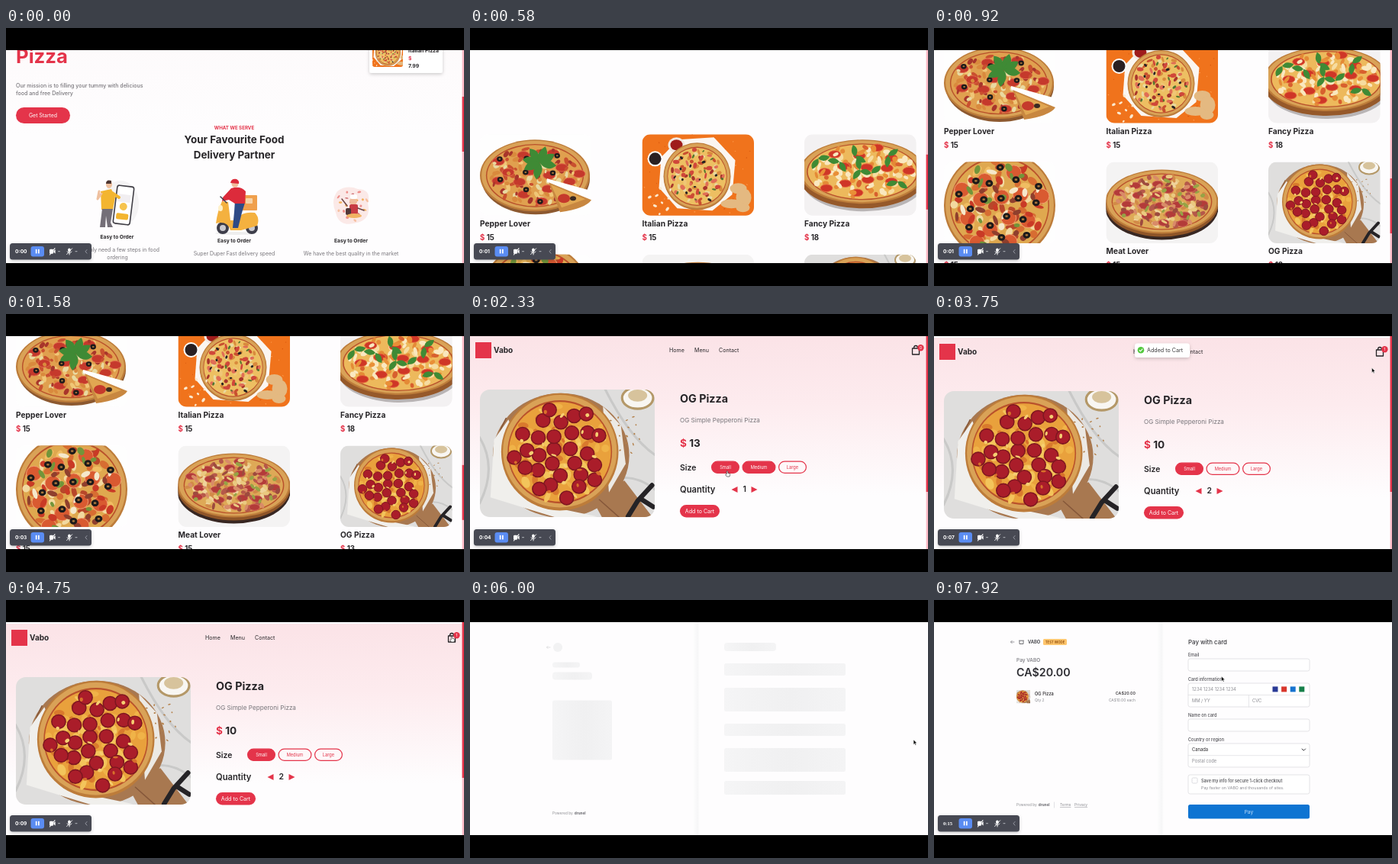
These frames come from a looping animation (600 px wide and 338 px high, 8000 ms). An HTML page:

```html
<!DOCTYPE html>
<html lang="en">
<head>
<meta charset="utf-8">
<title>Pizza order</title>
<style>
html, body { margin: 0; width: 100%; height: 100%; overflow: hidden; background: #000; }
svg { display: block; }
#stage { width: 100vw; height: 100vh; }
text { font-family: Inter, "Open Sans", sans-serif; white-space: pre; }
</style>
</head>
<body>
<svg id="stage" viewBox="0 0 600 338"></svg>
<script>
const LOOP = 8000, RED = '#e4344a', INK = '#272528', GREY = '#77757a';
const BRAND = 'Vabo', PAYER = 'drunel';

// ---- drawing helpers (all return markup) ----
const rect = (x, y, w, h, fill, r = 0, more = '') =>
  `<rect x="${x}" y="${y}" width="${w}" height="${h}" rx="${r}" fill="${fill}" ${more}/>`;
const oval = (x, y, rx, ry, fill, more = '') =>
  `<ellipse cx="${x}" cy="${y}" rx="${rx}" ry="${ry}" fill="${fill}" ${more}/>`;
const path = (d, fill, more = '') => `<path d="${d}" fill="${fill}" ${more}/>`;
const line = (d, color, w = 1, more = '') =>
  path(d, 'none', `stroke="${color}" stroke-width="${w}" stroke-linecap="round" stroke-linejoin="round" ${more}`);
const group = (body, id = '', more = '') => `<g ${id && `id="${id}"`} ${more}>${body}</g>`;
const move = (x, y, body) => group(body, '', `transform="translate(${x} ${y})"`);
// y is the middle of the capital letters
const text = (x, y, s, size, weight = 400, fill = INK, anchor = 'start', more = '') =>
  `<text x="${x}" y="${(y + size * 0.36).toFixed(2)}" font-size="${size}" font-weight="${weight}" fill="${fill}" text-anchor="${anchor}" ${more}>${s}</text>`;
const mid = (x, y, s, size, weight, fill, more) => text(x, y, s, size, weight, fill, 'middle', more);
let clips = 0;
const rounded = (x, y, w, h, r, body) => {
  const id = 'clip' + clips++;
  return `<clipPath id="${id}">${rect(x, y, w, h, '#000', r)}</clipPath>` + group(body, '', `clip-path="url(#${id})"`);
};

// ---- pizzas ----
let seed = 7;
const rnd = () => (seed = (seed * 16807) % 2147483647) / 2147483647;
const pick = list => list[Math.floor(rnd() * list.length)];

function spread(n, cx, cy, rx, ry, make) {
  const turn = rnd() * 6;
  let s = '';
  for (let i = 0; i < n; i++) {
    const a = turn + i * 2.4 + rnd() * 0.3, r = Math.sqrt((i + 0.5) / n);
    s += make((cx + rx * r * Math.cos(a)).toFixed(1), (cy + ry * r * Math.sin(a)).toFixed(1));
  }
  return s;
}
const bits = (n, size, colors) => (cx, cy, rx, ry) => spread(n, cx, cy, rx, ry, (x, y) =>
  oval(x, y, (size * (0.6 + rnd() * 0.6)).toFixed(1), (size * (0.35 + rnd() * 0.4)).toFixed(1), pick(colors),
    `transform="rotate(${Math.floor(rnd() * 180)} ${x} ${y})"`));
const slices = (n, size, fill, rim) => (cx, cy, rx, ry) => spread(n, cx, cy, rx, ry, (x, y) =>
  oval(x, y, size, (size * Math.max(ry / rx, 0.6)).toFixed(1), fill, `stroke="${rim}" stroke-width="1"`));
const olives = (n, size) => (cx, cy, rx, ry) => spread(n, cx, cy, rx, ry, (x, y) =>
  oval(x, y, size, size * 0.85, '#a8763c', `stroke="#1d1a1a" stroke-width="${size * 0.9}"`));
const pie = (cx, cy, rx, ry, cheese, ...tops) =>
  oval(cx, cy, rx, ry, '#bd7c3a') + oval(cx, cy - 0.5, rx * 0.97, ry * 0.96, '#d9a257') +
  oval(cx, cy, rx * 0.89, ry * 0.88, '#b9512b') + oval(cx, cy, rx * 0.87, ry * 0.85, cheese) +
  tops.map(f => f(cx, cy, rx * 0.82, ry * 0.8)).join('');
const leaf = (x, y, turn, size = 1) =>
  path('M0 0Q5 -9 17 -3Q11 7 0 0', '#3f8a35', `transform="translate(${x} ${y}) rotate(${turn}) scale(${size})"`);

const MIX = ['#f0c676', '#c9502f', '#e9d9a0', '#a8352b', '#d98a3d'];
const PHOTO = {
  pepper: rect(0, 0, 146, 107, '#fefefe') + oval(73, 58, 71, 47, '#8d5930') +
    pie(72, 54, 72, 47, '#e0a04f', bits(70, 5, MIX), slices(15, 8, '#c5392c', '#e0684a'), bits(45, 3.5, MIX), olives(9, 2.6)) +
    path('M88 58L146 74L130 108L88 62', '#fefefe') + path('M90 63L146 86Q139 97 105 102Z', '#c88740') +
    path('M93 66L138 85L107 96Z', '#e1a752') + oval(110, 84, 8, 6, '#c5392c') + oval(122, 84, 4, 3, '#3b2a22') +
    [-160, -115, -60, -20, 20, 110, 165].map(a => leaf(78, 37, a, 1.3)).join(''),
  italian: rect(0, 0, 147, 107, '#f0731c') + bits(60, 1, ['#ffa052', '#d9580e'])(73, 53, 80, 60) +
    path('M47 7L94 4L122 34L118 79L92 100L46 97L22 70L25 30Z', '#fbf6f1') +
    oval(45, 14, 11, 10, '#f2e9e2') + oval(45, 14, 8, 7, '#9f1c1c') + oval(17, 32, 10, 10, '#fff') + oval(17, 32, 8, 8, '#2a2022') +
    pie(72, 55, 44, 44, '#edbf62', bits(60, 3.5, MIX), bits(26, 4, ['#d0473a', '#e06d55']), bits(22, 2.4, ['#54772f', '#272321'])) +
    [[126, 71, 11, 7], [133, 83, 10, 12], [117, 91, 14, 6], [132, 96, 9, 6]].map(e => oval(...e, '#e4b981')).join('') +
    bits(9, 2.5, ['#fbe9cf'])(25, 85, 18, 20),
  fancy: rect(0, 0, 147, 107, '#f3f1f2') + oval(78, 62, 80, 39, '#b9b5b6') + oval(76, 57, 82, 40, '#96592a') +
    pie(76, 49, 82, 42, '#edb95c', bits(75, 5, ['#f6dca0', '#d8602e', '#e48a36', '#fae8c0']), slices(14, 8, '#cf3627', '#e86f40'), bits(24, 5, ['#f9e7bd', '#e98f37'])) +
    [[18, 32], [46, 36], [73, 46], [88, 51], [67, 29], [110, 28], [122, 62]].map(([x, y], i) => leaf(x, y, i * 67, 0.9) + leaf(x, y, i * 67 + 130, 0.9)).join(''),
  veggie: rect(0, 0, 146, 107, '#fefefe') +
    pie(73, 57, 73, 72, '#dfa84f', bits(70, 7, ['#f2d9a0', '#d76d32', '#f0bd62', '#b8472a']), slices(13, 10, '#d95a31', '#f0a070'), bits(45, 6, ['#f5e8cb', '#c93a26', '#72953a', '#8f3f2d']), olives(18, 3.4)),
  meat: rect(0, 0, 147, 107, '#f4f3f3') + oval(73, 60, 74, 42, '#382722') + oval(73, 56, 74, 42, '#8f5528') +
    pie(73, 52, 74, 42, '#dea957', bits(80, 5, ['#efd39b', '#d28a48', '#b5584a']), slices(20, 7, '#b33b39', '#cf6557'), bits(70, 4, ['#eac980', '#9d4a3e', '#d98b68', '#96a345'])),
  og: rect(0, 0, 147, 107, '#dfdedd') + line('M0 40Q15 65 0 95M105 0Q125 40 147 55M112 75Q130 70 147 84', '#c9c9c8', 2) +
    oval(68, 55, 57, 52, '#a87850') + path('M92 88L121 76L147 110L104 110Z', '#a87850') + line('M100 92L118 108M22 24Q9 47 17 74', '#86583a', 1) +
    path('M12 42L24 25L55 97L98 106L74 110L38 99L9 90Z', '#f0efec') + path('M103 14L118 30L122 62L108 86Z', '#ece9e4') +
    oval(132, 7, 13, 9, '#f8f6f2', 'stroke="#b49868" stroke-width="2"') + oval(132, 5, 8, 5, '#d7c39c') +
    line('M144 80L132 93L124 106M134 91L145 98', '#252326', 4) + bits(18, 1, ['#b4814b'])(121, 37, 15, 18) +
    pie(67, 52, 49, 49, '#e9a13c', bits(70, 4.5, ['#f3c45b', '#d97a2d', '#f0b348']), slices(29, 5.8, '#aa1d2a', '#7f1620'), bits(24, 2, ['#f6cf72', '#d8702b']))
};
const ogUse = (x, y, w, h, r) => rounded(x, y, w, h, r, `<use href="#og" x="${x}" y="${y}" width="${w}" height="${h}"/>`);

// ---- home page ----
const courier =
  oval(301, 269, 27, 2, '#eeeeee') + oval(284, 262, 8, 8, '#3d3d4a') + oval(322, 262, 8, 8, '#3d3d4a') +
  oval(284, 262, 4, 4, '#c9c9cf') + oval(322, 262, 4, 4, '#c9c9cf') +
  rect(308, 219, 21, 20, '#f0a04d', 1) + rect(314, 223, 9, 7, '#f7d3a8', 1) +
  path('M275 256Q277 240 283 227L291 228L294 252L304 252Q306 240 326 242Q333 249 329 259L308 265H294Q290 252 275 256Z', '#f4b13f') +
  path('M300 226L313 229L309 242L304 262H297L299 241Z', '#2e4a86') + path('M295 210Q307 206 314 214L313 230H300L292 225L283 227L284 222Z', '#dc2b3b') +
  oval(300, 204, 4.5, 5, '#f1bd9c') + path('M294 203Q295 197 302 198Q306 200 305 204Z', '#dc2b3b') +
  line('M281 221L289 229', '#3d3d4a', 1.5) + oval(281, 236, 3, 4, '#fff1c9');
const phoneMan =
  oval(150, 230, 24, 30, '#f4f3f4') +
  path('M124 214L138 211L143 222L140 238H125Z', '#f3b52f') + path('M126 237H140L137 255L140 261H133L131 246L130 261H123Z', '#746f78') +
  oval(135, 205, 4, 5, '#efc09f') + path('M131 204Q131 198 138 200L138 204Z', '#4b3430') + line('M125 217L120 224L122 214', '#efc09f', 3) +
  group(rect(143, 207, 22, 50, '#fff', 3, 'stroke="#403e45" stroke-width="1.6"') + rect(146, 218, 16, 10, '#f1eef1', 1) +
    oval(154, 234, 5, 5, '#f6c34d') + rect(146, 243, 16, 8, '#f3b52f', 2), '', 'transform="rotate(7 154 232)"') +
  line('M139 216L148 222', '#f3b52f', 4);
const chefs =
  path('M434 214Q446 205 461 211Q479 211 474 230Q479 250 460 255Q436 262 432 242Q425 226 434 214Z', '#fbe9e7') +
  bits(20, 2.4, ['#ee8f8a', '#f6c0a2', '#f3b25e', '#d2777a'])(453, 232, 21, 22) +
  oval(455, 227, 5, 5, '#efbd9c') + rect(450, 231, 11, 13, '#c73b43', 2) + rect(451, 218, 9, 6, '#fff', 2) +
  rect(445, 236, 7, 9, '#503738', 2) + oval(456, 246, 10, 3, '#f1b363') + line('M440 224L447 233M469 239L461 236', '#6a4444', 1.5);

const home = () => {
  const cols = [13, 225.5, 438], dishes = [
    ['pepper', 'Pepper Lover', 15], ['italian', 'Italian Pizza', 15], ['fancy', 'Fancy Pizza', 18],
    ['veggie', '', 15], ['meat', 'Meat Lover', 15], ['og', 'OG Pizza', 13]];
  const menu = dishes.map(([key, name, price], i) => {
    const x = cols[i % 3], y = 433 + (i > 2 ? 157.5 : 0);
    return move(x, y, rounded(0, 0, 146.5, 106.5, 11, PHOTO[key])) + text(x, y + 117, name, 10.2, 700) +
      text(x, y + 135.5, `<tspan fill="${RED}">$</tspan> ${price}`, 9.7, 700);
  }).join('');
  return rect(0, -40, 600, 360, 'url(#blush)') +
    rect(476, 0, 96, 59, '#fff', 3, 'filter="url(#soft)"') +
    rounded(480, 0, 40, 51, 3, move(480, 10, group(PHOTO.italian, '', 'transform="translate(-7 0) scale(.38 .4)"'))) +
    text(527, 30, 'Italian Pizza', 6.8, 700) + text(527, 40, '$', 6.8, 700, RED) + text(527, 50, '7.99', 6.8, 700) +
    text(13, 37, 'Pizza', 25.7, 700, RED) +
    text(13, 75.5, 'Our mission is to filling your tummy with delicious', 7.05, 500, GREY) +
    text(13, 85.5, 'food and free Delivery', 7.05, 500, GREY) +
    rect(13, 104, 71, 21, RED, 10.5) + mid(48.5, 114.5, 'Get Started', 6.9, 400, '#fff') +
    mid(299, 130.5, 'WHAT WE SERVE', 6.2, 700, RED) +
    mid(299, 146, 'Your Favourite Food', 13.45, 700, INK) + mid(299, 166, 'Delivery Partner', 13.45, 700, INK) +
    phoneMan + courier + chefs +
    mid(145.5, 273.5, 'Easy to Order', 6.7, 700, INK) + mid(299, 278.5, 'Easy to Order', 6.7, 700, INK) + mid(452, 278.5, 'Easy to Order', 6.7, 700, INK) +
    mid(146, 290.5, 'You only need a few steps in food', 6.9, 400, GREY) + mid(146, 300.5, 'ordering', 6.9, 400, GREY) +
    mid(299, 295.5, 'Super Duper Fast delivery speed', 6.9, 400, GREY) +
    mid(452, 295.5, 'We have the best quality in the market', 6.9, 400, GREY) + menu;
};

// ---- product page ----
const pill = (id, x, w, label) =>
  group(rect(x + 0.6, 193.2, w - 1.2, 15.2, '#fff', 7.6, `stroke="${RED}" stroke-width="1.2"`) + mid(x + w / 2, 200.8, label, 5.7, 400, RED), id);
const product = () =>
  rect(0, 29, 600, 290, 'url(#pink)') +
  rect(7, 37, 21, 21, RED) + text(31, 47.5, BRAND, 10, 700) +
  text(261, 47.5, 'Home', 7.1) + text(294, 47.5, 'Menu', 7.1) + text(326, 47.5, 'Contact', 7.1) +
  line('M579.5 45H588.5V53H579.5ZM581.5 45Q581.5 41.5 584 41.5T586.5 45', '#252326', 1.3) +
  oval(590.4, 44.2, 4.2, 4.2, RED) + mid(590.4, 44.2, '0', 5.4, 400, '#fff', 'id="badge"') +
  ogUse(13, 99, 229, 167, 13) +
  text(275, 110.5, 'OG Pizza', 14.3, 700) + text(275, 139.5, 'OG Simple Pepperoni Pizza', 8.15, 400, GREY) +
  text(275, 169, `<tspan fill="${RED}">$</tspan> <tspan id="price">13</tspan>`, 13.6, 700) +
  text(275, 201, 'Size', 10.4, 600) + pill('small', 316, 37, 'Small') + pill('medium', 356.5, 44, 'Medium') + pill('large', 404, 37, 'Large') +
  text(275, 229.5, 'Quantity', 11.2, 600) + path('M350.5 226V234L342.5 230Z', RED) +
  text(357.5, 229.5, '1', 10.4, 600, INK, 'start', 'id="qty"') + path('M368.5 226V234L376.5 230Z', RED, 'id="more"') +
  rect(275, 250, 52, 16.5, RED, 8.2) + mid(301, 258.2, 'Add to Cart', 7.1, 400, '#fff') +
  group(rect(263, 36.5, 72, 18.5, '#fff', 3.5, 'filter="url(#soft)"') + oval(271, 45.3, 4.3, 4.3, '#53c83e') +
    line('M269.2 45.5L270.5 46.8L273 43.9', '#fff', 1.1) + text(279, 45.4, 'Added to Cart', 7.15, 400, '#3b3a3c'), 'toast');

// ---- checkout ----
const bone = (x, y, w, h, r = 2.5) => rect(x, y, w, h, 'url(#bone)', r);
const powered = y => text(108, y, 'Powered by', 4.8, 400, '#8d8d92') + text(136.8, y, PAYER, 4.7, 700, '#66666c');
const skeleton = () =>
  line('M105 62H100.5M102 60.5L100.5 62L102 63.5', '#d8d8da', 0.8) + oval(115, 62, 6, 6, '#f2f2f3') +
  bone(108, 81.5, 36, 7, 3) + bone(108, 94.5, 52, 10, 4) + bone(108, 131.5, 78, 78) + bone(333, 56, 68, 11, 4) +
  [[83, 16], [115, 31], [162, 16], [194, 31], [237, 18]].map(([y, h]) => bone(333, y, 159, h)).join('') + powered(279);
const field = (y, h) => rect(333, y, 159, h, '#fff', 2.5, 'stroke="#e0e0e4" stroke-width=".9"');
const label = (y, s) => text(333, y, s, 5.6, 500, '#4d4d52');
const form = () => {
  const hint = '#8b8b91', rule = '#e0e0e4';
  return line('M105 55H100.5M102.3 53.2L100.5 55L102.3 56.8', '#858589', 0.8) +
    line('M112 54V57.5H117V54M111.5 53.2H117.5', '#707075', 1) + text(123, 55, BRAND.toUpperCase(), 5.8, 600, '#3b3b40') +
    rect(143, 51, 31, 8, '#ffc66e', 1.5) + mid(158.5, 55, 'TEST MODE', 4.4, 700, '#9b5a15') +
    text(108, 78.5, 'Pay ' + BRAND.toUpperCase(), 6.5, 500, '#76767c') + text(108, 94.5, 'CA$20.00', 14.3, 600, '#2f2f34') +
    ogUse(108, 118, 18, 17.5, 1) +
    text(132, 122.5, 'OG Pizza', 5.7, 500) + text(132, 131.5, 'Qty 2', 4.9, 400, hint) +
    text(264, 122.5, 'CA$20.00', 5.4, 500, INK, 'end') + text(264, 131.5, 'CA$10.00 each', 4.9, 400, hint, 'end') +
    powered(268.5) + line('M157.5 265V272', '#d4d4d8', 0.7) +
    text(165, 268.5, 'Terms', 4.9, 400, hint, 'start', 'text-decoration="underline"') +
    text(184, 268.5, 'Privacy', 4.9, 400, hint, 'start', 'text-decoration="underline"') +
    text(333, 55, 'Pay with card', 7.9, 500, '#37373c') +
    label(71.5, 'Email') + field(77, 16) +
    label(103.5, 'Card information') + field(109, 31) + line('M333 124.5H492M412.5 124.5V140', rule, 0.8) +
    text(338, 117, '1234 1234 1234 1234', 5.8, 400, hint) + text(338, 132, 'MM / YY', 5.8, 400, hint) + text(417, 132, 'CVC', 5.8, 400, hint) +
    ['#2a3a96', '#d8372c', '#1673cf', '#17804a'].map((c, i) => rect(443.5 + i * 11.6, 113.4, 7, 7, c)).join('') +
    label(151, 'Name on card') + field(156, 16) +
    label(183, 'Country or region') + field(188, 31) + line('M333 203.7H492', rule, 0.8) +
    text(338, 196, 'Canada', 5.8) + line('M482 195L484.3 197.3L486.6 195', '#3a3a3f', 1) + text(338, 211, 'Postal code', 5.8, 400, hint) +
    field(229, 25) + rect(338, 233, 7, 7, '#fff', 1.5, 'stroke="#d3d3d8" stroke-width=".8"') +
    text(350, 236.7, 'Save my info for secure 1-click checkout', 5.5, 500, '#45454a') +
    text(350, 245.7, `Pay faster on ${BRAND.toUpperCase()} and thousands of sites.`, 5.3, 400, hint) +
    rect(333, 268, 159, 18.5, '#0e74d2', 2.5) + mid(412.5, 277.2, 'Pay', 6.6, 500, '#a9d0f5');
};

// ---- recorder bar and pointer ----
const bar = () =>
  rect(5, 282, 107, 21.5, '#464a53', 3.5, 'filter="url(#soft)"') + text(12, 292.7, '0:00', 6.6, 700, '#fff', 'start', 'id="clock"') +
  rect(32.5, 286, 17.5, 13.5, '#5a8cf2', 3) + rect(38.8, 289.8, 1.7, 5.6, '#fff') + rect(42, 289.8, 1.7, 5.6, '#fff') +
  rect(57, 289.8, 5, 6, '#fff', 1.2) + path('M62.4 292L64.6 290.2V295.4L62.4 293.7Z', '#fff') + line('M57.4 297L64 288.6', '#fff', 1.1) +
  rect(81.2, 288.6, 3.4, 5.2, '#fff', 1.7) + line('M80 293Q83 297 86 293M83 295V297M79.6 296.6L86.6 288.8', '#fff', 0.9) +
  line('M68.5 292.7H70.5M91 292.7H93', '#c2c5cb', 0.9) + line('M106 290.5L104 292.8L106 295.1', '#a9adb6', 0.8);
const arrow = path('M0 0V6.4L1.5 5L2.5 7.2L3.6 6.7L2.6 4.6H4.6Z', '#111', 'stroke="#fff" stroke-width=".5"');
const hand = path('M-.8 0Q.4 -.8 .8 .4V2.4L3 2.9Q4 3.2 3.7 4.6L3 7H-.6L-2.4 4.4Q-1.9 3.3 -.8 4.2Z', '#fff', 'stroke="#222" stroke-width=".6"');

const fade = (id, x2, y2, ...stops) => `<linearGradient id="${id}" x2="${x2}" y2="${y2}">` +
  stops.map(([o, c]) => `<stop offset="${o}" stop-color="${c}"/>`).join('') + '</linearGradient>';

document.getElementById('stage').innerHTML = '<defs>' +
  fade('pink', 0, 1, [0, '#fbe3e7'], [0.3, '#fdebee'], [0.72, '#fefdfe']) + fade('blush', 0, 1, [0.15, '#fdfafb'], [0.5, '#fefdfe']) +
  fade('bone', 1, 0, [0, '#f5f5f6'], [0.3, '#f2f2f3'], [0.55, '#f0f0f1'], [1, '#f4f4f5']) + fade('edge', 1, 0, [0, '#fefefe'], [0.7, '#f6f6f7'], [1, '#fefefe']) +
  '<filter id="soft" x="-20%" y="-30%" width="140%" height="170%"><feDropShadow dx="0" dy="1.5" stdDeviation="2.2" flood-opacity=".2"/></filter>' +
  `<symbol id="og" viewBox="0 0 146.5 106.5" preserveAspectRatio="xMidYMid slice">${PHOTO.og}</symbol></defs>` +
  rect(0, 29, 600, 279, '#fefdfe') + group(home(), 'home') + group(product(), 'product') +
  group(rect(292, 29, 9, 279, 'url(#edge)') + group(skeleton(), 'skeleton') + group(form(), 'form'), 'checkout') +
  group(rect(597.6, 29, 2.4, 279, '#fbb9c5') + rect(597.6, 29, 2.4, 72, RED, 0, 'id="thumb"'), 'scroll') +
  group(bar(), 'bar') + group(group(arrow, 'arrow') + group(hand, 'hand'), 'pointer') +
  rect(0, 0, 600, 29, '#000') + rect(0, 308, 600, 30, '#000');

// ---- motion ----
const el = {};
document.querySelectorAll('#stage [id]').forEach(e => el[e.id] = e);
const show = (e, on) => e.setAttribute('visibility', on ? 'inherit' : 'hidden');
const place = (e, x, y) => e.setAttribute('transform', `translate(${x.toFixed(2)} ${y.toFixed(2)})`);
const write = (e, s) => { if (e.textContent !== s) e.textContent = s; };
const ease = p => p * p * (3 - 2 * p);
const span = (t, a, b) => Math.min(1, Math.max(0, (t - a) / (b - a)));

// rows: time, then values; eased between rows
function track(t, rows) {
  const i = rows.findIndex(r => r[0] > t);
  if (i === 0) return rows[0].slice(1);
  if (i < 0) return rows[rows.length - 1].slice(1);
  const a = rows[i - 1], b = rows[i], p = ease((t - a[0]) / (b[0] - a[0]));
  return a.slice(1).map((v, k) => v + (b[k + 1] - v) * p);
}
const SCROLL = [[80, 0], [860, 415], [1080, 415], [1400, 418]];
const POINTER = [[1830, 508, 238], [2290, 337, 206], [2420, 337, 206], [2680, 372, 229], [2860, 372, 229], [3120, 308, 258],
  [3330, 308, 258], [3750, 573.5, 70.5], [4050, 584, 48], [5400, 584, 48], [5830, 581, 183], [6040, 581, 183],
  [6170, 460, 172], [6830, 420, 164], [7080, 420, 164], [7700, 376.5, 100]];
const PAGE = { product: 1830, checkout: 5830, form: 7080 };

const paint = (e, on) => {
  e.children[0].setAttribute('fill', on ? RED : 'transparent');
  e.children[1].setAttribute('fill', on ? '#fff' : RED);
};

function render(t) {
  const onHome = t < PAGE.product, paying = t >= PAGE.checkout, buying = !onHome && !paying;
  const [y] = track(t, SCROLL);
  show(el.home, onHome);
  place(el.home, 0, -y);

  show(el.product, buying);
  place(el.product, 0, 2 * ease(span(t, 3400, 3650)));
  const small = t >= 2350, two = t >= 2780, added = t >= 3230;
  write(el.price, small ? '10' : '13');
  write(el.qty, two ? '2' : '1');
  place(el.more, two ? 2 : 0, 0);
  write(el.badge, added ? '1' : '0');
  paint(el.small, t >= 2280);
  paint(el.medium, !small);
  paint(el.large, false);
  const shown = ease(span(t, 3230, 3340)) * (1 - ease(span(t, 4230, 4330)));
  el.toast.setAttribute('opacity', shown);
  place(el.toast, 0, -14 * (1 - shown));

  show(el.checkout, paying);
  show(el.skeleton, t < PAGE.form);
  el.form.setAttribute('opacity', span(t, PAGE.form, PAGE.form + 100));

  show(el.scroll, !paying);
  el.thumb.setAttribute('y', onHome ? 90 + y * 0.258 : 29);
  el.thumb.setAttribute('height', onHome ? 72 : 204);

  show(el.bar, t < PAGE.checkout || t >= 6330);
  write(el.clock, '0:' + String(Math.floor(t / 500)).padStart(2, '0'));
  el.clock.style.fontFamily = paying ? '"Liberation Serif", serif' : '';

  const pointing = t > 2280 && t < 3400 || t > 4000 && t < 5450;
  show(el.pointer, !onHome);
  place(el.pointer, ...track(t, POINTER));
  show(el.arrow, !pointing);
  show(el.hand, pointing);
}

const start = performance.now();
function tick() {
  render((performance.now() - start) % LOOP);
  requestAnimationFrame(tick);
}
render(0);
requestAnimationFrame(tick);
</script>
</body>
</html>
```
